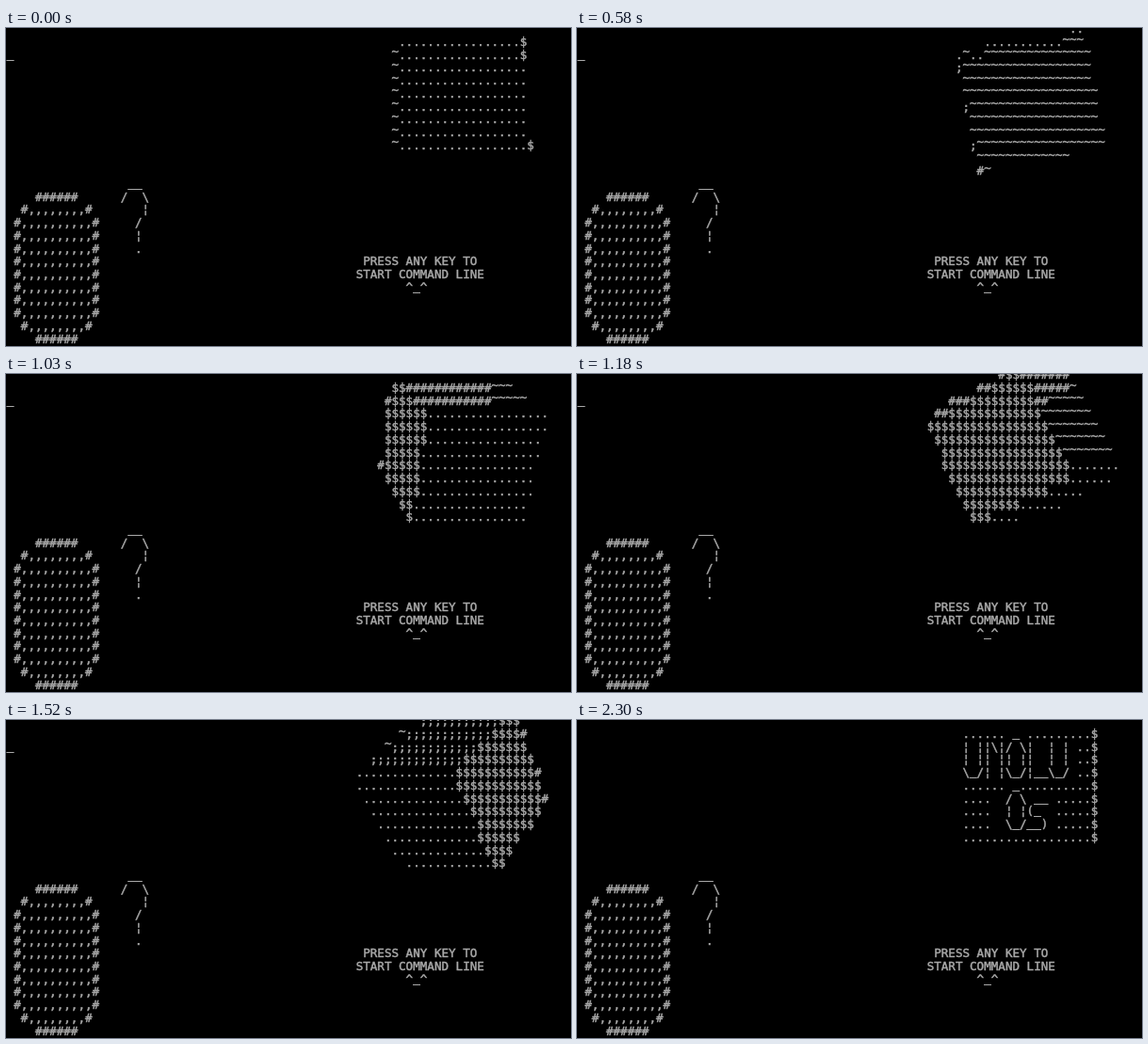
These frames come from a looping animation (600 by 338 pixels, 2.45 s). An HTML page with a canvas:

```html
<!DOCTYPE html>
<html lang="en">
<head>
<meta charset="utf-8">
<title>Command line boot screen</title>
<style>
  html, body { margin: 0; width: 100%; height: 100%; overflow: hidden; background: #000; }
  canvas { display: block; }
</style>
</head>
<body>
<canvas id="screen" width="600" height="338"></canvas>
<script>
const ctx = document.getElementById('screen').getContext('2d');

const LOOP = 2450, STEP = 33.8, BLINK = 267;
const CELL_W = 7.57, CELL_H = 13.72, LEFT = 0.7, BASE = 5.3;
const LIFT = { '~': -3.5, '_': -1 };

// Cube: half width, viewing distance, centre cell, and [step, pitch, yaw] of the tumble
const W = 10, DIST = 100, CX = 63.15, CY = 5.9;
const TURN = [[0, 3, 7], [9, 48, 34], [17, 100, 97], [30, 203, 200], [39, 273, 272], [49, 360, 360]];
const LAST = 53, STOP = 49;

// The sixth side stays open, so the inside shows through it
const FACES = [
  ['.', (u, v) => [u, v, -W]],
  ['$', (u, v) => [W, v, u]],
  ['~', (u, v) => [-W, v, -u]],
  ['#', (u, v) => [-u, v, W]],
  [';', (u, v) => [u, -W, -v]]
];

const LOGO = [
  '...... _ .........',
  '¦ ¦¦\\¦/ \\¦  ¦ ¦ ..',
  '¦ ¦¦ ¦¦ ¦¦  ¦ ¦ ..',
  '\\_/¦ ¦\\_/¦__\\_/ ..',
  '...... _..........',
  '....  / \\ __ .....',
  '....  ¦ ¦(_  .....',
  '....  \\_/__) .....',
  '..................'
];

function put(ch, col, row) {
  if (ch === ' ') return;
  const x = LEFT + col * CELL_W;
  const y = BASE + row * CELL_H + (LIFT[ch] || 0);
  ctx.fillText(ch, x, y);
  ctx.strokeText(ch, x, y);
}

function print(text, col, row) {
  [...text].forEach((ch, i) => put(ch, col + i, row));
}

function anglesAt(n) {
  const next = TURN.findIndex(([step]) => n < step);
  if (next < 0) return [0, 0];
  const [n0, ...from] = TURN[next - 1], [n1, ...to] = TURN[next];
  const p = (n - n0) / (n1 - n0);
  return from.map((a, i) => (a + (to[i] - a) * p) * Math.PI / 180);
}

function drawCube(n) {
  const [pitch, yaw] = anglesAt(n);
  const sp = Math.sin(pitch), cp = Math.cos(pitch);
  const sy = Math.sin(yaw), cy = Math.cos(yaw);
  const cells = new Map();
  for (const [ch, point] of FACES) {
    for (let u = -W; u < W; u++) {
      for (let v = -W; v < W; v++) {
        const [i, j, k] = point(u, v);
        const y = j * cp + k * sp;
        const z = k * cp - j * sp;
        const x = i * cy - z * sy;
        const depth = 1 / (DIST + z * cy + i * sy);
        const col = Math.floor(CX + 80 * x * depth);
        const row = Math.floor(CY + 40 * y * depth);
        const key = row * 80 + col;
        const old = cells.get(key);
        if (!old || depth > old.depth) cells.set(key, { ch, col, row, depth });
      }
    }
  }
  for (const { ch, col, row } of cells.values()) put(logoChar(ch, col, row, n), col, row);
}

// Once the cube rests, its front dissolves into the logo
function logoChar(ch, col, row, n) {
  const line = LOGO[row - 1], i = col - 54;
  if (n <= STOP || !line || i < 0 || i >= line.length) return ch;
  const order = (row * 37 + i * 59) % 101 / 101;
  return order * (LAST - STOP) < n - STOP ? line[i] : ch;
}

function drawOval() {
  for (let row = 13; row <= 24; row++) {
    const edge = Math.min(row - 13, 24 - row);
    const inset = edge === 0 ? 3 : edge === 1 ? 1 : 0;
    const inner = 10 - 2 * inset;
    print('#' + (edge ? ',' : '#').repeat(inner) + '#', 1 + inset, row);
  }
}

function drawQuestion() {
  print('__', 17, 12);
  print('/  \\', 16, 13);
  ['   ¦', '  /', '  ¦', '  .'].forEach((line, i) => print(line, 16, 14 + i));
}

function draw(now) {
  const t = now % LOOP;
  const n = Math.min(LAST, Math.floor((t + 6) / STEP));
  ctx.fillStyle = '#000';
  ctx.fillRect(0, 0, 600, 338);
  ctx.font = '12.57px "DejaVu Sans Mono", monospace';
  ctx.fillStyle = ctx.strokeStyle = '#aaa';
  ctx.lineWidth = 0.45;

  if (Math.floor((t + 106) / BLINK) % 2 === 0) put('_', 0, 2);
  drawCube(n);
  drawOval();
  drawQuestion();
  print('PRESS ANY KEY TO', 50, 18);
  print('START COMMAND LINE', 49, 19);
  print('^_^', 56, 20);
}

let start;
function tick(now) {
  start ??= now;
  draw(now - start);
  requestAnimationFrame(tick);
}
draw(0);
requestAnimationFrame(tick);
</script>
</body>
</html>
```
